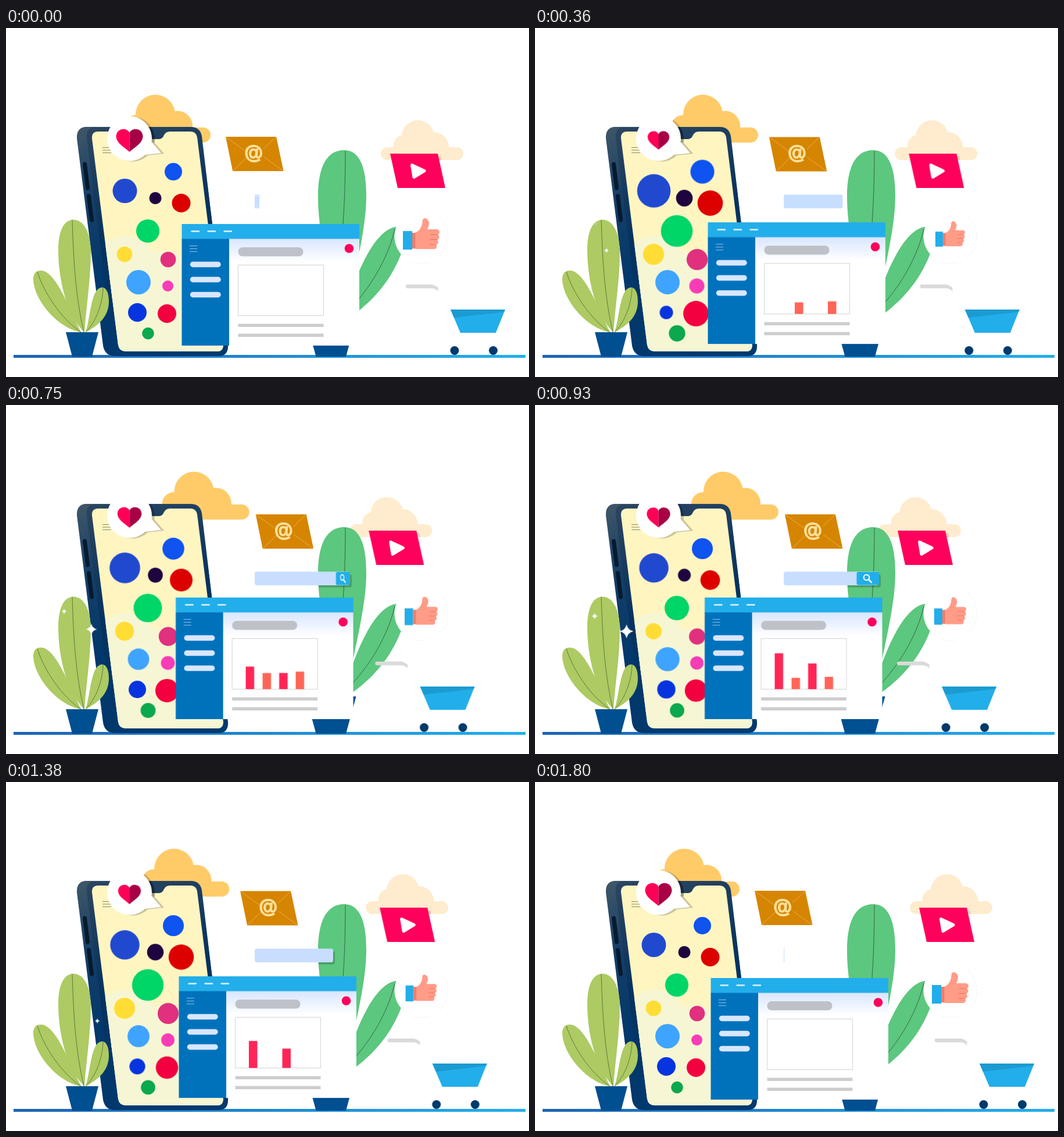
Recreate the animation shown at these times as an HTML page. Size 900 by 600 pixels, loop 1830 ms.

```html
<!DOCTYPE html>
<html lang="en">
<head>
<meta charset="utf-8">
<title>Social marketing</title>
<style>
html, body { margin: 0; width: 100%; height: 100%; overflow: hidden; background: #fff; }
svg { display: block; width: 100%; height: 100%; }

.slide, .cart, .beat, .grow, .swell, .dip, .shrink, .field, .button, .coral, .red, .starA, .starB {
  animation: 1830ms linear infinite;
}
.slide { animation-name: slide; }
.cart { animation-name: cart; }
.beat { animation-name: beat; }
.grow { animation-name: grow; }
.swell { animation-name: swell; }
.dip { animation-name: dip; }
.shrink { animation-name: shrink; }
.grow, .swell, .dip, .shrink { transform-box: fill-box; transform-origin: center; }
.field { animation-name: field; transform-origin: 428px 0; }
.button { animation-name: button; transform-origin: 592px 0; }
.coral { animation-name: coral; fill: #ff6557; }
.red { animation-name: red; fill: #ff2657; }
.coral, .red { transform-origin: 0 494.5px; }
.starA { animation-name: starA; }
.starB { animation-name: starB; }

.cloud1 { --dx: 67px; }
.cloud2 { --dx: -54px; }
.mail { --dx: 52px; --dy: 1px; }
.video { --dx: -37px; }
.window { --dx: -10.5px; --dy: -6px; }

@keyframes slide {
  0%, 98.36%, 100% { transform: none; }
  41.3%, 50.82% { transform: translate(var(--dx), var(--dy, 0px)); }
}
@keyframes cart {
  0%, 98.36%, 100% { transform: none; }
  50.82% { transform: translateX(-65px); }
}
@keyframes beat {
  0%, 98.36%, 100% { transform: none; }
  19.67% { transform: scale(.81); }
  32.79% { transform: scale(.928); }
  50.82% { transform: scale(.875); }
  62.1% { transform: none; }
  80.3% { transform: scale(.8); }
}
@keyframes grow {
  0%, 98.36%, 100% { transform: none; }
  19.67%, 32.79%, 67.21% { transform: scale(1.365); }
  50.82% { transform: scale(1.05); }
  85.25% { transform: scale(1.35); }
}
@keyframes swell {
  0%, 85.25%, 100% { transform: none; }
  19.67%, 67.21% { transform: scale(1.37); }
  32.79% { transform: scale(1.3); }
  50.82% { transform: scale(1.2); }
}
@keyframes dip {
  0%, 19.67%, 67.21%, 98.36%, 100% { transform: none; }
  32.79%, 85.25% { transform: scale(.785); }
  50.82% { transform: scale(.985); }
}
@keyframes shrink {
  0%, 98.36%, 100% { transform: none; }
  19.67% { transform: scale(.72); }
  32.79%, 67.21% { transform: scale(.9); }
  50.82% { transform: scale(.98); }
  85.25% { transform: scale(.79); }
}
@keyframes field {
  0%, 100% { transform: scaleX(.049); }
  32.79%, 70.6% { transform: none; }
  98.36% { transform: scaleX(.005); }
}
@keyframes button {
  0%, 32.79%, 70.5%, 100% { transform: scaleX(0); }
  45.9%, 60.1% { transform: none; }
}
@keyframes coral {
  0%, 74%, 100% { transform: scaleY(0); }
  33.6% { transform: none; }
}
@keyframes red {
  0%, 24.3%, 97.3%, 100% { transform: scaleY(0); }
  59.2% { transform: none; }
}
@keyframes starA {
  0%, 8% { transform: translate(112px, 386px) scale(0); }
  19.67% { transform: translate(123px, 382.5px) scale(.36); }
  32.79% { transform: translate(138px, 382.5px) scale(.65); }
  50.82% { transform: translate(157.5px, 389px) scale(1); }
  67.21% { transform: translate(159px, 404px) scale(.6); }
  85.25% { transform: translate(155px, 419px) scale(.12); }
  90%, 100% { transform: translate(154px, 423px) scale(0); }
}
@keyframes starB {
  0%, 15% { transform: translate(109px, 333px) scale(0); }
  19.67% { transform: translate(105px, 336.5px) scale(.1); }
  32.79% { transform: translate(98px, 348px) scale(.34); }
  50.82% { transform: translate(102.5px, 363px) scale(.46); }
  67.21% { transform: translate(129px, 364px) scale(.16); }
  74%, 100% { transform: translate(139px, 362px) scale(0); }
}
</style>
</head>
<body>
<svg viewBox="0 0 900 600">
  <defs>
    <linearGradient id="ground"><stop stop-color="#1d63b4"/><stop offset="1" stop-color="#22b0ec"/></linearGradient>
    <linearGradient id="side" x1="0" y1="0" x2=".25" y2="1">
      <stop stop-color="#405767"/><stop offset=".3" stop-color="#173f66"/><stop offset=".65" stop-color="#02386b"/>
    </linearGradient>
    <linearGradient id="frame" x1="0" y1="0" x2=".2" y2="1">
      <stop stop-color="#2c4560"/><stop offset=".5" stop-color="#05325f"/><stop offset="1" stop-color="#003a70"/>
    </linearGradient>
    <linearGradient id="sheen" x2="0" y2="1"><stop stop-color="#d8e6ff"/><stop offset="1" stop-color="#fff"/></linearGradient>

    <path id="cloudA" d="M202 197V170A20 20 0 0 1 223 150A34 34 0 0 1 290.500 143A26 26 0 0 1 321 171H339A13 13 0 0 1 339 197Z"/>
    <path id="cloudB" d="M656 227A11 11 0 0 1 656 205H667A18 18 0 0 1 681 184.500A28 28 0 0 1 736 179.300A25 25 0 0 1 762 205H776A11 11 0 0 1 776 227Z"/>
    <path id="phone" d="M136 170H318Q334 170 337 186L355 337L382 545Q383 564 366 564H188Q170 564 167 546L122 190Q121 172 136 170Z"/>
    <path id="screen" d="M157 178H236Q243 179 246 186Q248 191 254 191H264Q270 190 272 184Q275 178 282 178H318Q327 178 329 188L373.500 543Q375 556 363 556H206Q195 556 193 545L148 190Q147 179 157 178Z"/>
    <path id="tallLeaf" d="M582 210C613 210 620 250 620 288C620 345 603 405 582 512C556 440 537 350 537 290C537 240 551 210 582 210Z"/>
    <path id="bubble" d="M213 151.500A38.500 38.500 0 0 1 250.500 196L267 215L239 218A38.500 38.500 0 1 1 213 151.500Z"/>
    <path id="card" d="M661 216H743L756 275H674Z"/>
    <path id="star" d="M0-12Q2-2 12 0Q2 2 0 12Q-2 2-12 0Q-2-2 0-12Z" fill="#fff"/>

    <clipPath id="inPhone"><use href="#phone"/></clipPath>
    <clipPath id="inScreen"><use href="#screen"/></clipPath>
    <clipPath id="inLeaf"><use href="#tallLeaf"/></clipPath>
    <clipPath id="inCloudA"><use href="#cloudA" class="slide cloud1"/></clipPath>
    <clipPath id="inCloudB"><use href="#cloudB" class="slide cloud2"/></clipPath>
  </defs>

  <use href="#cloudA" class="slide cloud1" fill="#ffcb69"/>
  <use href="#cloudB" class="slide cloud2" fill="#ffebcd"/>
  <rect x="13" y="562" width="881" height="5" fill="url(#ground)"/>

  <!-- right plant -->
  <g fill="#5cc77e">
    <use href="#tallLeaf"/>
    <path d="M670 342C692 342 690 364 680 388C668 420 640 470 575 508C594 450 626 350 670 342Z"/>
  </g>
  <g fill="none" stroke="#35664a">
    <path d="M584 211Q584 280 580 337"/>
    <path d="M669 346C660 385 636 436 594 481"/>
  </g>
  <path d="M516 501H602.500L585 565H533.500Z" fill="#004f90"/>

  <!-- phone -->
  <use href="#phone" fill="url(#side)"/>
  <path d="M150 171H318Q333 171 336 186L381 545Q381 563 366 563H202Q186 562 184 546L139 190Q137 173 150 171Z" fill="url(#frame)"/>
  <path d="M135.500 234L140.500 275M142.500 289L147.500 330" stroke="#041a2e" stroke-width="7" stroke-linecap="round"/>
  <use href="#screen" fill="#fff5c1"/>
  <g clip-path="url(#inScreen)" fill="#f6f6d4">
    <circle cx="205" cy="414" r="56"/><circle cx="272" cy="440" r="56"/><path d="M150 430H390V560H150Z"/>
  </g>
  <path d="M166 205.500H180M166 210H181M166 214.500H181" stroke="#8c8770"/>

  <!-- left plant -->
  <g fill="#adca63">
    <path d="M116 329.500C138 330 146 360 146 385C146 430 138 480 135 523C108 498 90 440 90 382C90 352 98 330 116 329.500Z"/>
    <path d="M60 417C84 417 106 474 129 523C88 516 47 466 47 431C47 422 52 417 60 417Z"/>
    <path d="M165 446C174 446 177 458 177 470C177 497 158 512 137 523C146 495 146 447 165 446Z"/>
  </g>
  <g fill="none" stroke="#5e7a3a">
    <path d="M114 330C116 400 120 465 134 523"/>
    <path d="M54 419C65 455 95 500 129 523"/>
    <path d="M167 447C166 475 155 505 137 523"/>
  </g>
  <path d="M103 523H159L148 565H114Z" fill="#004f90"/>
  <use href="#star" class="starA"/>
  <use href="#star" class="starB"/>

  <!-- speech bubble -->
  <g fill="#000" fill-opacity=".2">
    <g clip-path="url(#inCloudA)"><use href="#bubble" x="5" y="1"/></g>
    <g clip-path="url(#inPhone)"><use href="#bubble" x="5" y="1"/></g>
  </g>
  <use href="#bubble" fill="#fff"/>
  <g class="beat" style="transform-origin:212.5px 193px">
    <path d="M212.500 213C205 206 189.500 198 189.500 186C190 172 208 170 212.500 180Z" fill="#ff0058"/>
    <path d="M212.500 213C220 206 235.500 198 235.500 186C235 172 217 170 212.500 180Z" fill="#a80045"/>
  </g>

  <!-- channel dots -->
  <circle class="swell" cx="204.500" cy="280" r="21" fill="#2149cf"/>
  <circle class="swell" cx="288" cy="247" r="15" fill="#0f53f0"/>
  <circle class="grow" cx="257" cy="292.500" r="10.500" fill="#1f0540"/>
  <circle class="grow" cx="301.500" cy="301" r="16" fill="#dd0000"/>
  <circle class="grow" cx="244" cy="349" r="20" fill="#00d568"/>
  <circle class="grow" cx="204" cy="389" r="13.300" fill="#ffdd35"/>
  <circle class="grow" cx="279" cy="398" r="13.300" fill="#e0307e"/>
  <circle class="dip" cx="228" cy="437" r="21" fill="#3fa4ff"/>
  <circle class="swell" cx="278.500" cy="443.500" r="9.500" fill="#f73cb8"/>
  <circle class="shrink" cx="226" cy="489" r="16" fill="#0635e0"/>
  <circle class="swell" cx="277" cy="491" r="16" fill="#f30040"/>
  <circle class="swell" cx="244.500" cy="525" r="10.300" fill="#0ba84e"/>

  <!-- search field -->
  <g clip-path="url(#inLeaf)"><rect class="field" x="432" y="291" width="163" height="22.500" rx="4" fill-opacity=".2"/></g>
  <rect class="field" x="428" y="286.500" width="163.500" height="23.500" rx="4" fill="#c7deff"/>
  <g class="button">
    <rect x="553.500" y="287" width="38.500" height="22.500" rx="3" fill="#22aeea"/>
    <path d="M574 300L579 305" stroke="#fff" stroke-width="2.500" stroke-linecap="round"/>
    <circle cx="570.500" cy="296.500" r="4.800" fill="none" stroke="#fff" stroke-width="2"/>
  </g>

  <!-- browser window -->
  <g class="slide window">
    <path d="M384 362H608V546H384Z" fill="#fff"/>
    <path d="M384 362H608V402H384Z" fill="url(#sheen)"/>
    <path d="M302.500 362H384V546H302.500Z" fill="#0072bc"/>
    <path d="M302.500 337H608V362.500H302.500Z" fill="#22aeea"/>
    <path d="M319.500 349.500H332M347.500 349.500H360M375.500 349.500H388" stroke="#e2f3ff" stroke-width="2.400" stroke-linecap="round"/>
    <path d="M316 374.500H329M316 379.500H329M316 384.500H329" stroke="#8fc3e8"/>
    <path d="M321.500 406.500H365M321.500 432.500H365M321.500 458.500H365" stroke="#d8e6ff" stroke-width="9.500" stroke-linecap="round"/>
    <rect x="399.500" y="377" width="112" height="15.500" rx="7.500" fill="#bfc1c8"/>
    <circle cx="590.500" cy="379" r="7.800" fill="#ff005c"/>
    <rect x="399.500" y="407.500" width="147" height="87" fill="#fff" stroke="#d3d3d3"/>
    <path d="M399.500 511.300H546.500M399.500 528.300H546.500" stroke="#cdcdcd" stroke-width="5.400"/>
    <rect class="red" x="423" y="413.500" width="14.500" height="81"/>
    <rect class="coral" x="452" y="460.500" width="14.500" height="34"/>
    <rect class="red" x="480.500" y="436.500" width="14.500" height="58"/>
    <rect class="coral" x="509" y="457.500" width="14.500" height="37"/>
  </g>

  <!-- mail -->
  <g class="slide mail">
    <path d="M378 187H465L477.500 246H390Z" fill="#d68500"/>
    <path d="M378 187L414 213M465 187L443 208M390 246L414 223M477.500 246L444 222" stroke="#eab04a"/>
    <text transform="translate(427.500 225) skewX(8)" text-anchor="middle" font-family="'Liberation Sans', Arial, sans-serif" font-weight="700" font-size="33" fill="#ffe09a" stroke="#ffe09a" stroke-width="1.600">@</text>
  </g>

  <!-- video -->
  <g clip-path="url(#inCloudB)"><g class="slide video"><use href="#card" x="5" y="4" fill-opacity=".12"/></g></g>
  <g class="slide video">
    <use href="#card" fill="#ff005c"/>
    <path d="M698.500 235.500L702 256.500L720 245.500Z" fill="#fff" stroke="#fff" stroke-width="5" stroke-linejoin="round"/>
  </g>

  <!-- thumbs up -->
  <circle cx="714.500" cy="358.500" r="46" fill="#fff"/>
  <path d="M745 324A46 46 0 0 1 741 396M727 403A46 46 0 0 1 698 402" fill="none" stroke="#e6e6e6" stroke-width=".8" stroke-dasharray="3 3"/>
  <g class="beat" style="transform-origin:714.5px 354.5px">
    <path d="M683 349H699V381H683Z" fill="#22aeea"/>
    <path d="M699 352H704C711 349 716 343 716.500 332Q717 327 721 327Q727 328 728 335Q728 341 725 346H742Q746 347 746 350.500Q746 354 743 355Q746 357 745.500 360Q745 363 742 364Q744.500 366 744 369Q743 372 740 372Q742 374 741 377Q740 380 736 380H707Q703 379 699 379Z" fill="#ff9c87"/>
    <path d="M699 352H704.500V379H699Z" fill="#ef7d6c"/>
    <path d="M730 355H743M729 363.500H742M729 372H740" stroke="#e9705f"/>
  </g>

  <!-- cart -->
  <g class="cart">
    <path d="M691 441H733Q738 442 743.500 446V453Q739 447.500 732 447.500H691A3.200 3.200 0 0 1 691 441Z" fill="#dadada"/>
    <path d="M765 484H859L843 524H782Z" fill="#22aeea"/>
    <path d="M765 484H859L857.500 488L771 498Z" fill="#1b9bd1"/>
    <g fill="#00396b"><circle cx="772" cy="554.500" r="7.500"/><circle cx="838.500" cy="554.500" r="7.500"/></g>
  </g>
</svg>
</body>
</html>
```
